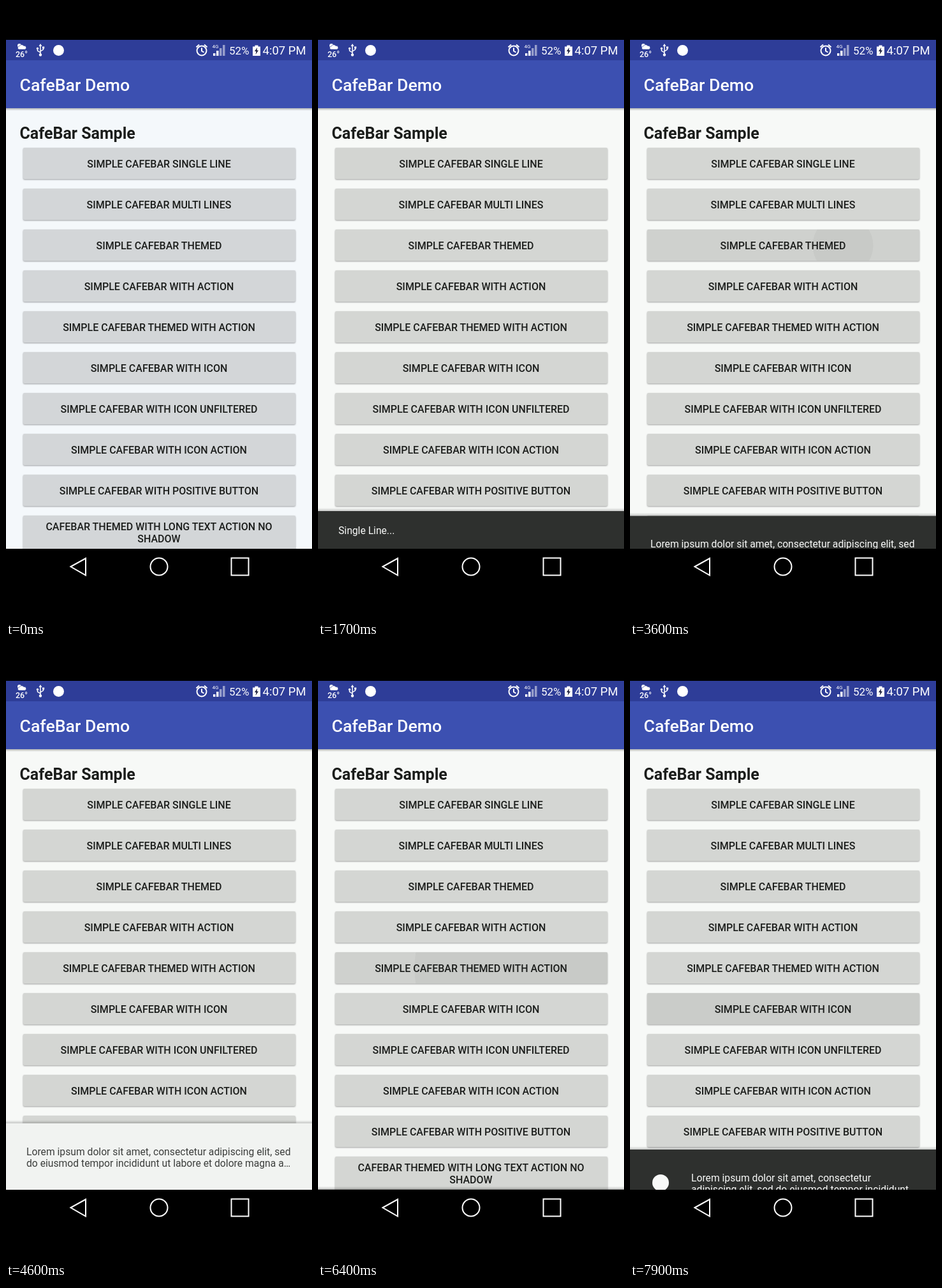
Animation, 480 px wide and 960 px high, one loop 8000 ms. Source, as an HTML page:

```html
<!DOCTYPE html>
<html lang="en">
<head>
<meta charset="utf-8">
<title>CafeBar Demo</title>
<style>
html, body { margin: 0; width: 100%; height: 100%; overflow: hidden; background: #000; }
svg { display: block; font-family: Roboto, sans-serif; }
#stage { --cool: 100%; }
#page { fill: color-mix(in srgb, #f4f8fb var(--cool), #f7f9f7); }
#buttons { fill: color-mix(in srgb, #d3d6d8 var(--cool), #d4d6d3); filter: drop-shadow(0 1px 1.3px rgba(0,0,0,.36)); }
#labels { font-size: 16px; font-weight: 500; text-anchor: middle; fill: #1b1d1b; }
.bar { font-size: 15.7px; }
.action { font-size: 16px; font-weight: 700; }
</style>
</head>
<body>
<svg id="stage" width="480" height="960" viewBox="0 0 480 960">
  <defs>
    <linearGradient id="down" x2="0" y2="1">
      <stop stop-color="#000" stop-opacity=".28"/><stop offset="1" stop-color="#000" stop-opacity="0"/>
    </linearGradient>
    <linearGradient id="up" x2="0" y2="1">
      <stop stop-color="#000" stop-opacity="0"/><stop offset="1" stop-color="#000" stop-opacity=".2"/>
    </linearGradient>
    <clipPath id="screen"><rect y="53" width="480" height="797"/></clipPath>
  </defs>
  <rect width="480" height="960"/>
  <g clip-path="url(#screen)">
    <rect id="page" y="53" width="480" height="797"/>
    <text x="21.5" y="208" font-size="25" font-weight="700" fill="#1b1d1b">CafeBar Sample</text>
    <g id="buttons"></g>
    <svg id="ripple" x="27" width="427" height="49">
      <rect id="wash" width="427" height="49" rx="2"/>
      <circle id="spot" cx="307" cy="25" opacity=".034"/>
    </svg>
    <g id="labels"></g>
    <rect y="160" width="480" height="4" fill="url(#down)"/>
    <rect y="53" width="480" height="32" fill="#2e3d98"/>
    <rect y="85" width="480" height="75" fill="#3c50b1"/>
    <text x="21.5" y="133" font-size="26.67" font-weight="500" fill="#fff">CafeBar Demo</text>
    <g id="bars"></g>
  </g>

  <g fill="#fff">
    <circle cx="21" cy="62" r="3"/>
    <path d="M20 68a2.6 2.6 0 0 1 1-5 4 4 0 0 1 7-.5 2.8 2.8 0 0 1 1.500 5.500z" stroke="#2e3d98" stroke-width=".6"/>
    <text x="15" y="79.500" font-size="12.500" font-weight="500">26°</text>
    <g fill="none" stroke="#fff" stroke-width="1.500">
      <path d="M54 61V76M54 73L49.500 70V67M54 71L58.500 68V65"/>
    </g>
    <path d="M54 59l2.500 4h-5z"/>
    <circle cx="54" cy="76.500" r="2.200"/><circle cx="49.500" cy="66.500" r="1.700"/>
    <rect x="57" y="63.500" width="3.200" height="3.200"/>
    <circle cx="82.500" cy="69.500" r="8.500"/>
    <g fill="none" stroke="#fff" stroke-width="2">
      <circle cx="307" cy="70" r="7.500"/>
      <path d="M307 65.500V70.500L310.500 72.500M298.500 64.500L303 60.500M311 60.500L315.500 64.500"/>
    </g>
    <text x="323.500" y="66" font-size="8">4G</text>
    <rect x="325" y="74" width="3.500" height="4"/>
    <rect x="330" y="70" width="3.500" height="8"/>
    <g opacity=".5">
      <rect x="335" y="66" width="3.500" height="12"/>
      <rect x="340" y="61" width="3.500" height="17"/>
    </g>
    <text x="350" y="76" font-size="17">52%</text>
    <path d="M387 63.500h3.500V61.500h5v2h3.500V78h-12z"/>
    <path d="M394 65l-4 6h2.500l-1 5 4.500-6.500h-2.500z" fill="#1b1d3b"/>
    <text x="402.500" y="76" font-size="18.500">4:07 PM</text>
  </g>

  <g fill="none" stroke="#fff" stroke-width="2">
    <path d="M101.500 878L125 865V891.500z"/>
    <circle cx="240" cy="878" r="13.500"/>
    <rect x="353.500" y="864.500" width="27" height="27"/>
  </g>
</svg>
<script>
const $ = id => document.getElementById(id);
const clamp = v => Math.min(1, Math.max(0, v));
const LOOP = 8000, BOTTOM = 850, SLIDE = 250, DELAY = 120;

const names = ["SINGLE LINE", "MULTI LINES", "THEMED", "WITH ACTION", "THEMED WITH ACTION", "WITH ICON",
  "WITH ICON UNFILTERED", "WITH ICON ACTION", "WITH POSITIVE BUTTON"];
const buttonY = i => 222 + 64 * i;
const text = (x, y, s, extra = "") => `<text x="${x}" y="${y}" ${extra}>${s}</text>`;

$("buttons").innerHTML = [...names, ""].map((_, i) =>
  `<rect x="27" y="${buttonY(i)}" width="427" height="${i < 9 ? 49 : 68}" rx="2"/>`).join("");
$("labels").innerHTML = names.map((n, i) => text(240, buttonY(i) + 30.7, "SIMPLE CAFEBAR " + n)).join("")
  + text(240, 820.7, "CAFEBAR THEMED WITH LONG TEXT ACTION NO") + text(240, 839.5, "SHADOW");

const action = (y, color) => text(390, y, "ACTION", `class="action" fill="${color}"`);
const lines = (x, y, a, b) => text(x, y, a) + text(x, y + 18, b);
const lorem = lines(32, 49.5, "Lorem ipsum dolor sit amet, consectetur adipiscing elit, sed",
  "do eiusmod tempor incididunt ut labore et dolore magna a…");

// One bar per tapped button, in button order
const bars = [
  { tap: 900, h: 59, body: text(32, 36, "Single Line...") },
  { tap: 2250, h: 104, body: lorem },
  { tap: 3393, h: 104, light: true, body: lorem },
  { tap: 4906, h: 61, body: text(32, 36, "CafeBar with Action") + action(36, "#03a9f4") },
  { tap: 6060, h: 112, light: true, body: lines(32, 53.5, "Lorem ipsum dolor sit amet, consectetur",
      "adipiscing elit, sed do eiusmod tempor inci…") + action(62, "#3a3c3a") },
  { tap: 7432, h: 104, body: `<circle cx="48" cy="52" r="13"/>` + lines(96, 49.5,
      "Lorem ipsum dolor sit amet, consectetur", "adipiscing elit, sed do eiusmod tempor incididunt") }
];
$("bars").innerHTML = bars.map(b => `<g class="bar" fill="${b.light ? "#3c3e3c" : "#f8f9f8"}">
  <rect y="-5" width="480" height="5" fill="url(#up)"/>
  <rect width="480" height="${b.h}" fill="${b.light ? "#f1f3f1" : "#2e302e"}"/>${b.body}</g>`).join("");
bars.forEach((b, i) => {
  b.el = $("bars").children[i];
  b.enter = b.tap + DELAY + (i ? SLIDE : 0);
  b.leave = i < bars.length - 1 ? bars[i + 1].tap + DELAY : Infinity;
});

// cubic-bezier(.4, 0, .2, 1)
function ease(x) {
  let lo = 0, hi = 1, s = .5;
  for (let i = 0; i < 20; i++) {
    s = (lo + hi) / 2;
    const r = 1 - s;
    if (1.2 * r * r * s + .6 * r * s * s + s * s * s < x) lo = s; else hi = s;
  }
  return s * s * (3 - 2 * s);
}

function drawBar(b, t) {
  const shown = t > b.enter && t < b.leave + SLIDE;
  b.el.style.display = shown ? "" : "none";
  if (!shown) return;
  const up = ease(clamp((t - b.enter) / SLIDE)) - ease(clamp((t - b.leave) / SLIDE));
  b.el.setAttribute("transform", `translate(0 ${BOTTOM - b.h * up})`);
}

function drawRipple(t) {
  const i = bars.findLastIndex(b => t >= b.tap);
  const age = i < 0 ? Infinity : t - bars[i].tap;
  $("ripple").style.opacity = 1 - clamp((age - 350) / 500);
  if (age > 850) return;
  $("ripple").setAttribute("y", buttonY(i));
  $("wash").setAttribute("opacity", .024 * clamp(age / 200));
  $("spot").setAttribute("r", 20 + 26 * (age / 205) ** 3.6);
}

function draw(now) {
  const t = now % LOOP;
  $("stage").style.setProperty("--cool", 100 * (1 - clamp((t - 500) / 500)) + "%");
  bars.forEach(b => drawBar(b, t));
  drawRipple(t);
  requestAnimationFrame(draw);
}
draw(performance.now());
</script>
</body>
</html>
```
